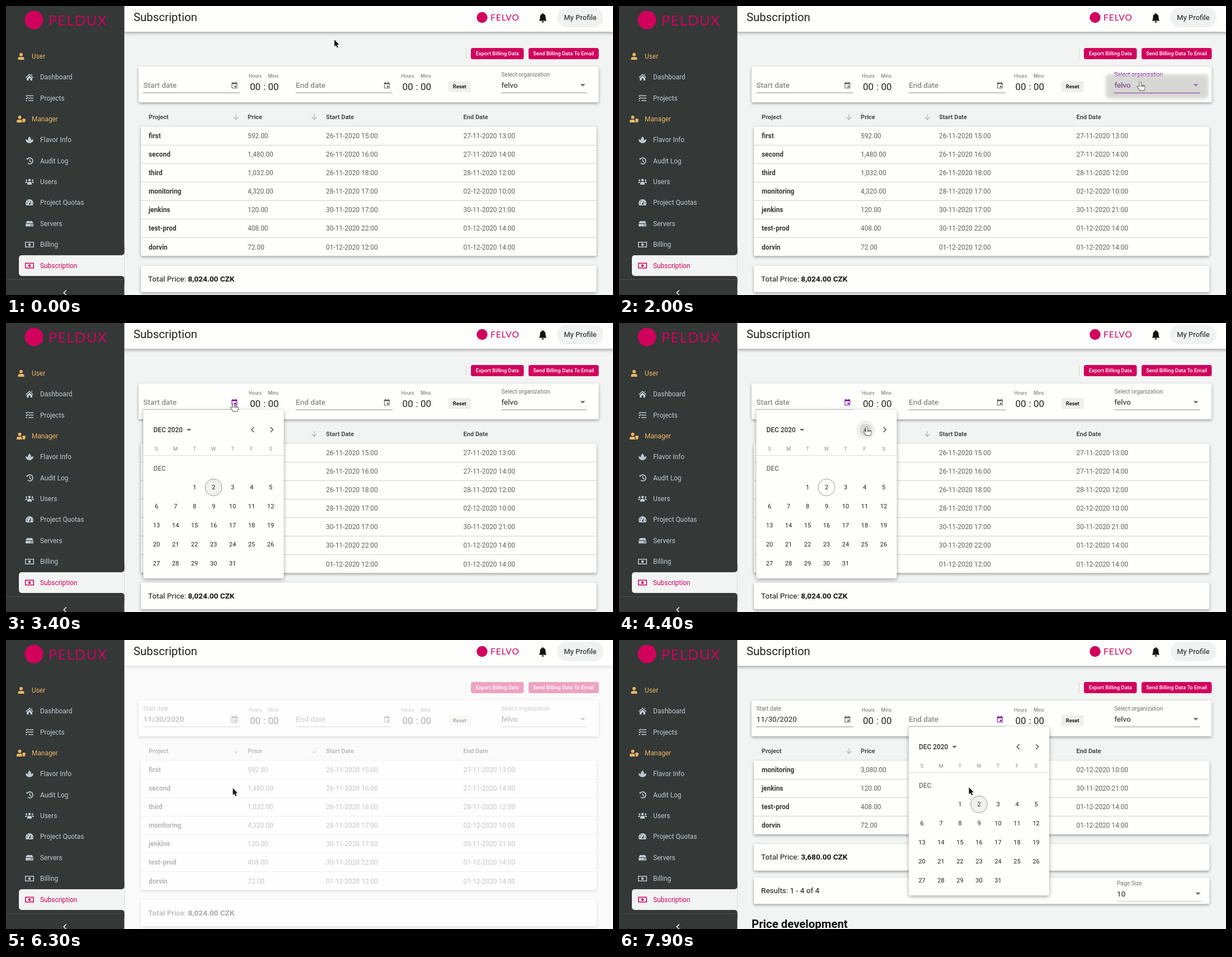
Recreate the animation shown at these times as an HTML page with a canvas. Size 1085x516 px, loop 8000 ms.

```html
<!DOCTYPE html>
<html lang="en">
<head>
<meta charset="utf-8">
<title>Subscription</title>
<style>
html, body { margin: 0; width: 100%; height: 100%; overflow: hidden; background: #f2f3f3; }
canvas { display: block; width: 1085px; height: 516px; }
</style>
</head>
<body>
<canvas id="stage"></canvas>
<script>
const W = 1085, H = 516, LOOP = 8000, STEP = 100;
const canvas = document.getElementById('stage');
const ctx = canvas.getContext('2d');
const ratio = window.devicePixelRatio || 1;
canvas.width = W * ratio;
canvas.height = H * ratio;

const PINK = '#d0005c', PURPLE = '#7a00a8', CARD = '#fefefc', PAGE = '#f2f3f3';
const DARK = '#343837', MUTED = '#c0cad2', ORANGE = '#eab566';
const FIELD_GAP = 272.5, ROW = 33.1, TABLE_TOP = 215.5;

const ICONS = {
  user: 'M-3 -3.3a3 3 0 1 0 6 0a3 3 0 1 0 -6 0ZM-5.5 6V4Q-5.5 1 -2.5 1H2.5Q5.5 1 5.5 4V6Z',
  shield: 'M-5.5 -3.3a3 3 0 1 0 6 0a3 3 0 1 0 -6 0ZM-8 6V4Q-8 1 -5 1H1V4L3 6ZM2 0L5 -1.2L8 0Q8 5 5 6.5Q2 5 2 0Z',
  home: 'M-7 .2L0 -6L7 .2L6 1.2L0 -4L-6 1.2ZM-5 1.7L0 -2.7L5 1.7V6H1.5V2.5H-1.5V6H-5ZM3.2 -5.5H5V-3.2L3.2 -4.8Z',
  list: 'M-2 -5H7V-3.4H-2ZM-2 -.8H7V.8H-2ZM-2 3.4H7V5H-2ZM-7 -4.3l1 -1l1 1l2 -2l1 1l-3 3ZM-7 0l1 -1l1 1l2 -2l1 1l-3 3ZM-6.5 3.2h2v2h-2Z',
  leaf: 'M0 -6Q4 -2 2.5 1Q1 2 0 4Q-1 2 -2.5 1Q-4 -2 0 -6ZM-7 -1Q-1 0 0 4.5Q1 0 7 -1Q7 5 0 6Q-7 5 -7 -1Z',
  users: 'M-2.3 -2.8a2.3 2.3 0 1 0 4.6 0a2.3 2.3 0 1 0 -4.6 0ZM-4 5.5V3Q-4 .5 -2 .5H2Q4 .5 4 3V5.5ZM-7 -2.5a1.6 1.6 0 1 0 3.2 0a1.6 1.6 0 1 0 -3.2 0ZM3.8 -2.5a1.6 1.6 0 1 0 3.2 0a1.6 1.6 0 1 0 -3.2 0ZM-8 2.5Q-8 0 -6 0H-4L-5 2.5ZM8 2.5Q8 0 6 0H4L5 2.5Z',
  gauge: 'M-5.8 5A7 7 0 1 1 5.8 5ZM-1.4 3.4L2.4 -3.2L1.6 3.6ZM-5.2 .3h1.5v1.5h-1.5ZM-3.6 -3.5h1.5v1.5h-1.5ZM4 .3h1.5v1.5h-1.5Z',
  disk: 'M-7 1.2Q-7 .4 -6 .4H6Q7 .4 7 1.2V5H-7ZM-4.5 -4.5H4.5L7 -.5H-7ZM2 2h1.4v1.4h-1.4ZM4.3 2h1.4v1.4h-1.4Z',
  money: 'M-8 -5H8V5H-8ZM-6.5 -3.5V3.5H6.5V-3.5ZM-2.2 0a2.2 2.6 0 1 0 4.4 0a2.2 2.6 0 1 0 -4.4 0Z',
  bell: 'M-7 5.5Q-5 4 -5 -1Q-5 -6 -1 -6.8V-8H1V-6.8Q5 -6 5 -1Q5 4 7 5.5ZM-2 6.5H2Q2 8.7 0 8.7Q-2 8.7 -2 6.5Z',
  calendar: 'M-5 -4.5H5V5.5H-5ZM-4 -2V4.5H4V-2ZM.2 .8H3V3.6H.2ZM-3.3 -6h1.3v1.5h-1.3ZM2 -6h1.3v1.5h-1.3Z',
  arrow: 'M0 0V12.5L2.8 9.9L4.8 14.5L6.8 13.6L4.8 9.1H8.5Z',
  hand: 'M-1.6 8.5V1.2a1.4 1.4 0 0 1 2.8 0V5.3L6.3 6.4Q8 6.8 8 8.5Q8 11 6.8 12.5V14.6H-1.5V13.3Q-3.5 11 -5.5 8.8Q-5.5 7 -3.8 7.2L-1.6 8.8Z'
};
for (const key in ICONS) ICONS[key] = new Path2D(ICONS[key]);

const MENU = [
  ['Dashboard', 'home', 127], ['Projects', 'list', 164.5], ['Flavor Info', 'leaf', 239],
  ['Audit Log', 'history', 276.5], ['Users', 'users', 313.5], ['Project Quotas', 'gauge', 351],
  ['Servers', 'disk', 388.5], ['Billing', 'money', 426]
];

const LATE = [
  ['jenkins', '120.00', '30-11-2020 17:00', '30-11-2020 21:00'],
  ['test-prod', '408.00', '30-11-2020 22:00', '01-12-2020 14:00'],
  ['dorvin', '72.00', '01-12-2020 12:00', '01-12-2020 14:00']
];
const ALL_ROWS = [
  ['first', '592.00', '26-11-2020 15:00', '27-11-2020 13:00'],
  ['second', '1,480.00', '26-11-2020 16:00', '27-11-2020 14:00'],
  ['third', '1,032.00', '26-11-2020 18:00', '28-11-2020 12:00'],
  ['monitoring', '4,320.00', '28-11-2020 17:00', '02-12-2020 10:00'], ...LATE
];
const FILTERED = [['monitoring', '3,080.00', '30-11-2020 00:00', '02-12-2020 10:00'], ...LATE];

// time, x, y, pointing hand
const POINTER = [
  [0, 587, 60, 0], [100, 640, 72, 0], [300, 790, 112, 0], [500, 915, 146, 1], [600, 935, 147, 1],
  [1500, 935, 147, 1], [1700, 932, 136, 1], [2000, 932, 136, 1], [2100, 890, 156, 0],
  [2300, 760, 190, 0], [2500, 540, 200, 0], [2700, 388.5, 151, 0], [2800, 399, 143, 0],
  [3000, 407, 143, 1], [3400, 407, 143, 1], [4000, 436, 174, 1], [4300, 443, 186, 1],
  [4400, 443, 186, 1], [4800, 436, 185, 1], [4900, 436, 185, 1], [5000, 399, 361, 1],
  [5100, 399, 361, 1], [5200, 358, 403, 1], [5300, 358, 403, 1], [5500, 307, 427.5, 1],
  [6000, 307, 427.5, 1], [6200, 380, 310, 0], [6300, 405.5, 264.5, 0], [6500, 406, 265, 0],
  [6900, 415, 250, 0], [7000, 430, 240, 0], [7400, 672, 140, 0], [7500, 681, 139, 1],
  [7800, 681, 139, 1], [7900, 625.5, 263, 0]
];

const ramp = (t, a, b) => Math.max(0, Math.min(1, (t - a) / (b - a)));

function text(s, x, cy, size, color, weight = 400, align = 'left') {
  ctx.font = `${weight} ${size}px Roboto, sans-serif`;
  ctx.fillStyle = color;
  ctx.textAlign = align;
  ctx.fillText(s, x, cy + size * 0.355);
}

function wordmark(s, x, base, size, spacing) {
  ctx.font = `${size}px Lato, sans-serif`;
  ctx.textAlign = 'left';
  ctx.fillStyle = PINK;
  ctx.letterSpacing = spacing + 'px';
  ctx.fillText(s, x, base);
  ctx.letterSpacing = '0px';
}

function rect(x, y, w, h, color) {
  ctx.fillStyle = color;
  ctx.fillRect(x, y, w, h);
}

function box(x, y, w, h, r, color) {
  ctx.fillStyle = color;
  ctx.beginPath();
  ctx.roundRect(x, y, w, h, r);
  ctx.fill();
}

function card(x, y, w, h, r = 3, blur = 5, color = CARD) {
  ctx.save();
  ctx.shadowColor = 'rgba(0,0,0,.36)';
  ctx.shadowBlur = blur * ratio;
  ctx.shadowOffsetY = 2 * ratio;
  box(x, y, w, h, r, color);
  ctx.restore();
}

function disc(x, y, r, color, stroke) {
  ctx.beginPath();
  ctx.arc(x, y, r, 0, Math.PI * 2);
  if (color) { ctx.fillStyle = color; ctx.fill(); }
  if (stroke) { ctx.strokeStyle = stroke; ctx.lineWidth = 1; ctx.stroke(); }
}

function line(color, width, ...pts) {
  ctx.strokeStyle = color;
  ctx.lineWidth = width;
  ctx.beginPath();
  for (let i = 0; i < pts.length; i += 2) ctx.lineTo(pts[i], pts[i + 1]);
  ctx.stroke();
}

function icon(name, x, y, color) {
  ctx.save();
  ctx.translate(x, y);
  ctx.fillStyle = color;
  ctx.fill(ICONS[name], 'evenodd');
  ctx.restore();
}

function historyIcon(x, y) {
  ctx.strokeStyle = MUTED;
  ctx.lineWidth = 1.7;
  ctx.beginPath();
  ctx.arc(x + .5, y, 5.4, -2.5, 2.3);
  ctx.stroke();
  line(MUTED, 1.5, x + .5, y - 3, x + .5, y + .6, x + 3, y + 2);
  caret(x - 4, y - 3, MUTED, 2.6);
}

function caret(x, y, color, r = 4.5) {
  ctx.fillStyle = color;
  ctx.beginPath();
  ctx.moveTo(x - r, y - r / 2);
  ctx.lineTo(x + r, y - r / 2);
  ctx.lineTo(x, y + r / 2);
  ctx.fill();
}

function chevron(x, y, dir, color, r = 4.5) {
  line(color, 1.6, x - dir * r / 2, y - r, x + dir * r / 2, y, x - dir * r / 2, y + r);
}

function sortArrow(x) {
  line('#b4b6b6', 1.3, x, 193, x, 202.5);
  line('#b4b6b6', 1.3, x - 4.3, 198.3, x, 202.7, x + 4.3, 198.3);
}

function sidebar() {
  rect(0, 0, 211.5, H, DARK);
  disc(50, 25, 16.5, PINK);
  wordmark('PELDUX', 76, 34.5, 25, 1.6);
  icon('user', 27, 90, ORANGE);
  text('User', 46, 90, 11.9, ORANGE);
  icon('shield', 27, 202, ORANGE);
  text('Manager', 46, 202, 11.9, ORANGE);
  for (const [label, name, y] of MENU) {
    if (name === 'history') historyIcon(42, y);
    else icon(name, 42, y, MUTED);
    text(label, 61, y, 11.9, MUTED);
  }
  rect(206, 440, 5.5, 47, PAGE);
  box(195, 430, 16.5, 15, [0, 0, 5, 0], DARK);
  box(195, 482, 16.5, 15, [0, 5, 0, 0], DARK);
  box(23, 445, 188.5, 37, [5, 0, 0, 5], PAGE);
  icon('money', 42, 463.5, PINK);
  text('Subscription', 61, 463.5, 11.9, PINK);
  rect(0, 488, 211, 1, '#4a4f4e');
  chevron(105.5, 512, -1, '#f4f4f4', 4.5);
}

function header() {
  card(211, -10, 900, 56, 0, 6);
  text('Subscription', 228, 20, 20.4, '#222');
  disc(851, 20.5, 9.7, PINK);
  wordmark('FELVO', 866, 26, 15.5, 1);
  icon('bell', 959.5, 21, '#111');
  box(985, 3, 83, 35, 17.5, '#f0f1f1');
  text('My Profile', 1026.5, 20.5, 12.9, '#444', 500, 'center');
}

function dateField(dx, label, value, open, ring) {
  ctx.save();
  ctx.translate(dx, 0);
  if (value) {
    text(label, 245.5, 122, 10.2, '#707070');
    text(value, 245.5, 141.5, 13.6, '#222');
  } else text(label, 245.5, 141.5, 13.6, '#707070');
  rect(245, 154.5, 173.5, 1, '#8c8c8c');
  if (ring) disc(408.3, 141.5, 10, '#e3e4e2');
  icon('calendar', 408.3, 141.5, open ? PURPLE : '#5c5c5c');
  text('Hours', 434, 124.5, 8.5, '#707070');
  text('Mins', 468.5, 124.5, 8.5, '#707070');
  text('00', 436, 144, 17, '#222');
  text(':', 462, 143.5, 17, '#222', 400, 'center');
  text('00', 468.5, 144, 17, '#222');
  ctx.restore();
}

function filters(t) {
  const focused = t >= 900 && t < 3200;
  const accent = focused ? PURPLE : '#707070';
  rect(822, 76, 1, 19, '#d9d4c8');
  box(831, 75, 94.5, 20, 3.5, PINK);
  text('Export Billing Data', 878.3, 85, 9.35, '#fff', 500, 'center');
  box(934, 75, 125.5, 20, 3.5, PINK);
  text('Send Billing Data To Email', 996.7, 85, 9.35, '#fff', 500, 'center');
  card(237, 108, 822.5, 64);
  const ring = (t >= 2800 && t < 3200) || (t >= 5800 && t < 7400);
  dateField(0, 'Start date', t >= 5800 ? '11/30/2020' : '', t >= 3200 && t < 5800, ring);
  dateField(FIELD_GAP, 'End date', '', t >= 7500, false);
  box(790.5, 134, 40.5, 19.5, 3, '#eeeeed');
  text('Reset', 810.7, 144, 9.35, '#222', 700, 'center');
  text('Select organization', 885.5, 122, 10.2, accent);
  text('felvo', 885.5, 141.5, 13.6, '#222');
  caret(1031, 141.5, accent);
  rect(885, 154.5, 153.5, focused ? 1.7 : 1, focused ? PURPLE : '#8c8c8c');
}

function table(filtered) {
  const rows = filtered ? FILTERED : ALL_ROWS;
  const end = TABLE_TOP + rows.length * ROW;
  const heads = [['Project', 255], ['Price', 432], ['Start Date', 572], ['End Date', 817.5]];
  for (const [label, x] of heads) text(label, x, 198.5, 11.05, '#4c4c4c', 700);
  sortArrow(411);
  sortArrow(551);
  card(241, TABLE_TOP, 814.5, end - TABLE_TOP - 1);
  rows.forEach((row, i) => {
    const y = TABLE_TOP + 16.2 + i * ROW;
    if (i) rect(241, Math.round(TABLE_TOP + i * ROW) - 1, 814.5, 1, '#d0d1cf');
    row.forEach((cell, c) => text(cell, heads[c][1], y, 11.9, c ? '#606060' : '#383838', c ? 400 : 700));
  });
  card(241, end + 16.3, 814.5, 47.5);
  text('Total Price: ', 254, end + 39.5, 13.6, '#111');
  const w = ctx.measureText('Total Price: ').width;
  text(filtered ? '3,680.00 CZK' : '8,024.00 CZK', 254 + w, end + 39.5, 13.6, '#111', 700);
  if (!filtered) return;
  card(241, end + 76.3, 814.5, 47);
  text('Results: 1 - 4 of 4', 254, end + 99, 13.6, '#111');
  text('Page Size', 890, end + 86, 10.2, '#707070');
  text('10', 890, end + 105, 13.6, '#222');
  caret(1035, end + 105, '#707070');
  rect(890, end + 118, 152, 1, '#c4c4c4');
  text('Price development', 237, end + 159, 20.4, '#111', 700);
}

function calendar(dx, alpha, o) {
  if (alpha <= 0) return;
  ctx.save();
  ctx.globalAlpha = alpha;
  ctx.translate(dx, 155);
  if (!o.closing) ctx.scale(1, 0.8 + 0.2 * alpha);
  ctx.translate(0, -155);
  card(245.5, 155, 251, 301, 3, 7);
  text(o.month + ' 2020', 263.5, 191, 11.9, '#333', 500);
  caret(o.month === 'DEC' ? 327 : 329.5, 191, '#666', 4.2);
  if (o.hover) disc(441, 191, 17, '#efefed');
  if (o.ripple) disc(441, 191, o.ripple, `rgba(0,0,0,${0.09 * o.rippleAlpha})`);
  chevron(441, 190.5, -1, '#555');
  chevron(475, 190.5, 1, '#555');
  [...'SMTWTFS'].forEach((d, i) => text(d, 269 + 34 * i, 224.5, 9.35, '#8c8c8c', 400, 'center'));
  rect(245.5, 236, 251, 1, '#dcdcda');
  text(o.month, 263.5, 260, 11.9, '#757575', 500);
  const [first, count] = o.month === 'DEC' ? [2, 31] : [0, 30];
  for (let d = 1; d <= count; d++) {
    const cell = d - 1 + first;
    const x = 269 + cell % 7 * 34, y = 293.5 + Math.floor(cell / 7) * 34;
    const picked = o.picked === d;
    if (picked) {
      ctx.globalAlpha = Math.min(1, alpha * 1.6);
      disc(x, y, 15, '#9a10b0');
    }
    if (o.month === 'DEC' && d === 2) disc(x, y, 15, o.focus ? '#f0f0ee' : null, '#999');
    text(d, x, y, 11.05, picked ? '#fff' : '#222', 400, 'center');
    ctx.globalAlpha = alpha;
  }
  ctx.restore();
}

function dropdown(t) {
  const alpha = t < 1900 ? ramp(t, 800, 1000) : 1 - ramp(t, 1900, 2100);
  if (alpha <= 0) return;
  ctx.save();
  ctx.globalAlpha = alpha;
  card(871, 121.5, 181.5, 41, 3, 7, '#dddeda');
  text('felvo', 885.5, 141.5, 13.6, PURPLE);
  ctx.restore();
}

function pointer(t) {
  let i = POINTER.length - 1;
  while (POINTER[i][0] > t) i--;
  const a = POINTER[i], b = POINTER[i + 1] || a;
  const k = a === b ? 0 : ramp(t, a[0], b[0]);
  const shape = a[3] ? ICONS.hand : ICONS.arrow;
  ctx.save();
  ctx.translate(a[1] + (b[1] - a[1]) * k, a[2] + (b[2] - a[2]) * k);
  ctx.lineJoin = 'round';
  ctx.strokeStyle = a[3] ? '#111' : '#fff';
  ctx.lineWidth = a[3] ? 1.2 : 1.6;
  ctx.fillStyle = a[3] ? '#fff' : '#111';
  ctx.stroke(shape);
  ctx.fill(shape);
  if (a[3]) {
    line('#111', .9, 1.2, 5.5, 1.2, 8.5);
    line('#111', .9, 3.6, 6, 3.6, 8.5);
    line('#111', .9, 5.9, 6.5, 5.9, 8.8);
  }
  ctx.restore();
}

function draw(t) {
  ctx.setTransform(ratio, 0, 0, ratio, 0, 0);
  rect(0, 0, W, H, PAGE);
  filters(t);
  table(t >= 6500);
  header();
  const veil = 0.64 * (t < 6500 ? ramp(t, 6000, 6300) : 1 - ramp(t, 6500, 6800));
  if (veil > 0) rect(211, 46, W - 211, H - 46, `rgba(254,255,253,${veil})`);
  sidebar();
  dropdown(t);
  if (t < 5900) {
    const closing = t >= 5800;
    calendar(0, closing ? 0.32 : ramp(t, 3100, 3300), {
      month: t < 4500 ? 'DEC' : 'NOV',
      focus: t < 4300,
      hover: t >= 4100 && t < 4900,
      ripple: t >= 4300 && t < 4900 ? Math.min(17, 11 + (t - 4400) * 0.03) : 0,
      rippleAlpha: 1 - ramp(t, 4600, 4900),
      picked: closing ? 30 : 0,
      closing
    });
  }
  calendar(FIELD_GAP, ramp(t, 7400, 7600), { month: 'DEC', focus: true });
  pointer(t);
}

const start = performance.now();
function tick() {
  const t = (performance.now() - start) % LOOP;
  draw(Math.floor(t / STEP) * STEP);
  requestAnimationFrame(tick);
}
tick();
</script>
</body>
</html>
```
